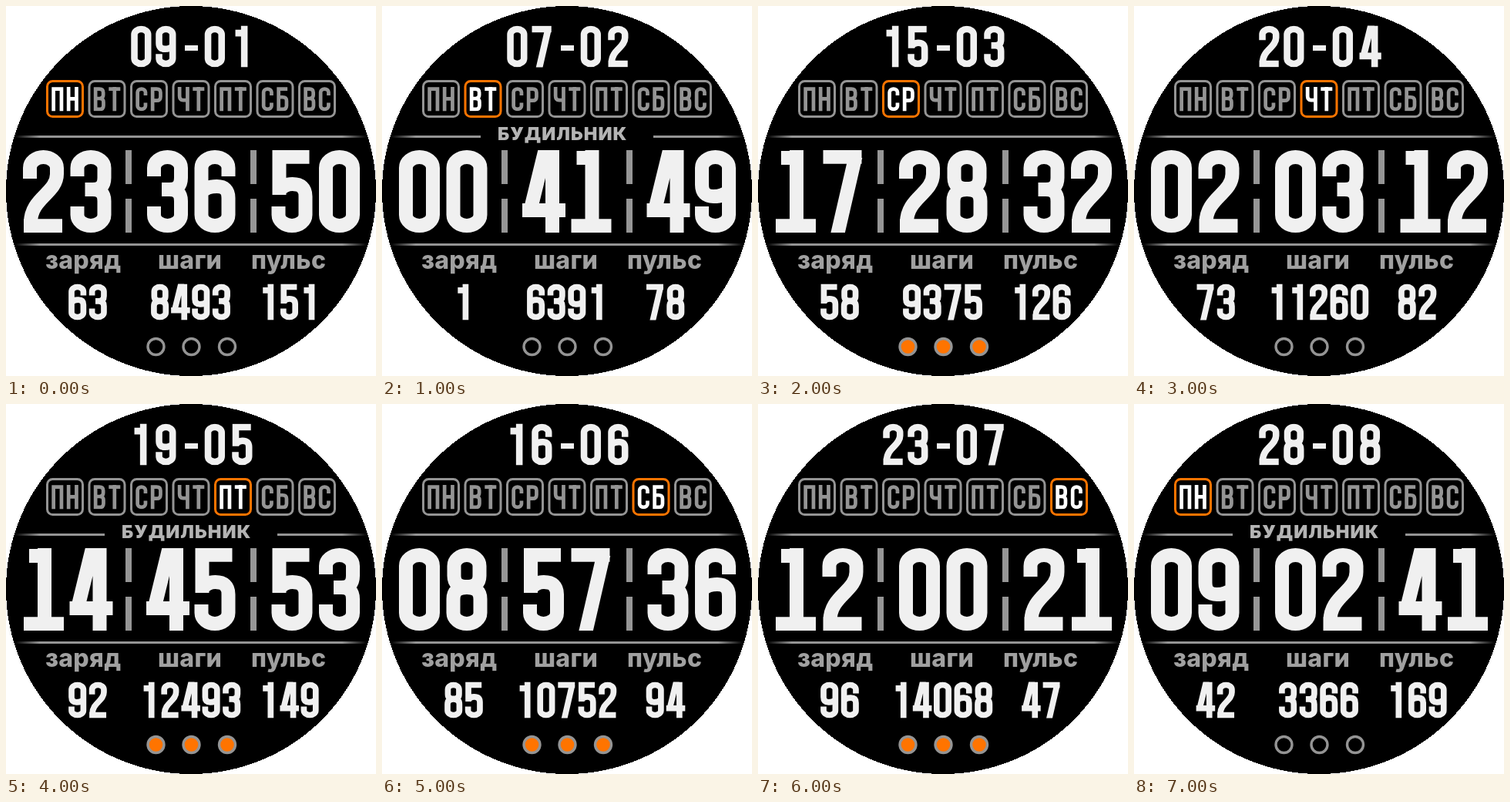
Write an HTML page with a canvas that moves like this. It is 480x480 px and loops after 8 s.

```html
<!DOCTYPE html>
<html lang="ru">
<head>
<meta charset="utf-8">
<style>
  html, body { margin: 0; width: 100%; height: 100%; overflow: hidden; background: #fff; }
  canvas { display: block; width: 480px; height: 480px; }
</style>
</head>
<body>
<canvas id="face" width="480" height="480"></canvas>
<script>
const ctx = document.getElementById('face').getContext('2d');
const WHITE = '#f0f0f0', GREY = '#949494', LABEL = '#a0a0a0', ORANGE = '#ff7400';
const STEP = 1000;
const CELL_W = 53, CELL_H = 107;

// Condensed glyphs as centre lines in a 53 x 107 cell.
const ARC = 'A17.5 14 0 0 ';
const GLYPHS = {
  0: `M9 23${ARC}1 44 23V84${ARC}1 9 84Z`,
  1: 'M32 0V107M9 19H32',
  2: `M9 37V23${ARC}1 44 23V31C44 56 10 62 10 94M1 98.25H51`,
  3: `M9 34V23${ARC}1 44 23V36Q44 51 29 51H19M29 51Q44 51 44 66V84${ARC}1 9 84V73`,
  4: 'M38 0V107M30 -6L9 80M-1 78H55',
  5: `M49 8.75H10V58M10 53Q16 44 27 44Q44 44 44 60V84${ARC}1 9 84V73`,
  6: `M44 34V23${ARC}0 9 23V84${ARC}0 44 84V62Q44 47 29 47Q15 47 9 55`,
  7: 'M1 8.75H51M43 8L19 112',
  8: `M10 23A16.5 14 0 0 1 43 23V36Q43 50 26.5 50Q10 50 10 36Z
      M9 66Q9 51 26.5 51Q44 51 44 66V84${ARC}1 9 84Z`,
  9: `M9 73V84${ARC}0 44 84V23${ARC}0 9 23V45Q9 60 24 60Q38 60 44 52`,
  slab1: 'M28 0V107M8 10H28M1 98.25H53',
  П: 'M9 107V8.75H44V107',
  Н: 'M9 0V107M44 0V107M9 52H44',
  В: 'M27 98.25H9V8.75H26Q43 8.75 43 25V36Q43 51 27 51H9M27 51Q44 51 44 67V82Q44 98.25 27 98.25',
  Т: 'M1 8.75H52M26.5 0V107',
  С: `M44 37V23${ARC}0 9 23V84${ARC}0 44 84V70`,
  Р: 'M9 107V8.75H27Q44 8.75 44 25V43Q44 60 27 60H9',
  Ч: 'M9 0V40Q9 58 24 58H44M44 0V107',
  Б: 'M48 8.75H9V98.25H27Q44 98.25 44 82V61Q44 45 27 45H9'
};
for (const key in GLYPHS) GLYPHS[key] = new Path2D(GLYPHS[key]);

const DAYS = ['ПН', 'ВТ', 'СР', 'ЧТ', 'ПТ', 'СБ', 'ВС'];

const SCREENS = [
  { date: '09-01', time: '233650', charge: '63', steps: '8493', pulse: '151' },
  { date: '07-02', time: '004149', charge: '1', steps: '6391', pulse: '78', alarm: true },
  { date: '15-03', time: '172832', charge: '58', steps: '9375', pulse: '126', dots: true },
  { date: '20-04', time: '020312', charge: '73', steps: '11260', pulse: '82' },
  { date: '19-05', time: '144553', charge: '92', steps: '12493', pulse: '149', alarm: true, dots: true },
  { date: '16-06', time: '085736', charge: '85', steps: '10752', pulse: '94', dots: true },
  { date: '23-07', time: '120021', charge: '96', steps: '14068', pulse: '47', dots: true },
  { date: '28-08', time: '090241', charge: '42', steps: '3366', pulse: '169', alarm: true }
];

function glyph(key, x, y, height, color, weight = 17.5) {
  const scale = height / CELL_H;
  ctx.save();
  ctx.translate(x, y);
  ctx.scale(scale, scale);
  ctx.beginPath();
  ctx.rect(-4, 0, CELL_W + 8, CELL_H);
  ctx.clip();
  ctx.strokeStyle = color;
  ctx.lineWidth = weight;
  ctx.stroke(GLYPHS[key]);
  ctx.restore();
}

function label(text, x, y, font, spacing, color = LABEL) {
  ctx.font = font;
  ctx.letterSpacing = spacing + 'px';
  ctx.fillStyle = color;
  ctx.fillText(text, x, y);
}

function number(text, center, y, height, advance) {
  const width = (text.length - 1) * advance + CELL_W * height / CELL_H;
  [...text].forEach((c, i) => glyph(c, center - width / 2 + i * advance, y, height, WHITE));
}

// Hard-edged disc, one row at a time.
function drawDisc() {
  ctx.fillStyle = '#fff';
  ctx.fillRect(0, 0, 480, 480);
  ctx.fillStyle = '#000';
  for (let y = 0; y < 480; y++) {
    const half = Math.round(Math.sqrt(240 ** 2 - (y + 0.5 - 240) ** 2));
    ctx.fillRect(240 - half, y, half * 2, 1);
  }
}

function drawDate(date) {
  [0, 1, 3, 4].forEach((i, n) => glyph(date[i], [162, 194, 257.5, 293][n], 25.5, 54, WHITE, 17));
  ctx.fillStyle = WHITE;
  ctx.fillRect(232, 51, 17, 7);
}

function drawDays(active) {
  DAYS.forEach((day, i) => {
    const x = 53.5 + i * 54.5, on = i === active;
    ctx.beginPath();
    ctx.roundRect(x, 97.5, 46, 46, 7);
    ctx.lineWidth = 3;
    ctx.strokeStyle = on ? ORANGE : GREY;
    ctx.stroke();
    [...day].forEach((c, n) =>
      glyph(c, x + 5.5 + n * 19.5, 105, 31.5, on ? '#fff' : GREY, 16));
  });
}

function drawRules(alarm) {
  const fade = ctx.createLinearGradient(12, 0, 468, 0);
  fade.addColorStop(0, 'rgba(148,148,148,0)');
  fade.addColorStop(0.07, GREY);
  fade.addColorStop(0.93, GREY);
  fade.addColorStop(1, 'rgba(148,148,148,0)');
  ctx.fillStyle = fade;
  ctx.fillRect(12, 308, 456, 3);
  if (alarm) {
    ctx.fillRect(12, 168, 116, 3);
    ctx.fillRect(352, 168, 116, 3);
    label('БУДИЛЬНИК', 150, 174, '900 23.5px Inter, sans-serif', 1, '#b4b4b4');
  } else {
    ctx.fillRect(12, 168, 456, 3);
  }
}

function drawTime(time) {
  [...time].forEach((c, i) => {
    const x = [22, 183, 344.5][i >> 1] + (i % 2) * 61.5;
    glyph(c === '1' ? 'slab1' : c, x, 187, 107, WHITE, 18);
  });
  ctx.fillStyle = '#969696';
  for (const x of [155, 317]) {
    ctx.fillRect(x, 187, 8, 44);
    ctx.fillRect(x, 250, 8, 44);
  }
}

function drawDots(on) {
  for (const x of [194.5, 240.5, 287]) {
    ctx.beginPath();
    ctx.arc(x, 442, 10.5, 0, Math.PI * 2);
    if (on) {
      ctx.fillStyle = ORANGE;
      ctx.fill();
    }
    ctx.lineWidth = 3.4;
    ctx.strokeStyle = GREY;
    ctx.stroke();
  }
}

function draw(index) {
  const s = SCREENS[index];
  drawDisc();
  drawDate(s.date);
  drawDays(index % 7);
  drawRules(s.alarm);
  drawTime(s.time);

  const font = '800 32px Inter, sans-serif';
  label('заряд', 51, 341, font, 0.3);
  label('шаги', 197, 341, font, 0.3);
  label('пульс', 318, 341, font, 0.3);
  number(s.charge, 106, 360.5, 47, 26.6);
  number(s.steps, 239.5, 360.5, 47, 26.6);
  number(s.pulse, 367.5, 360.5, 47, 26.6);
  drawDots(s.dots);
}

const start = performance.now();
function tick() {
  const elapsed = Math.max(0, performance.now() - start);
  draw(Math.floor(elapsed / STEP) % SCREENS.length);
  requestAnimationFrame(tick);
}
tick();
</script>
</body>
</html>
```
